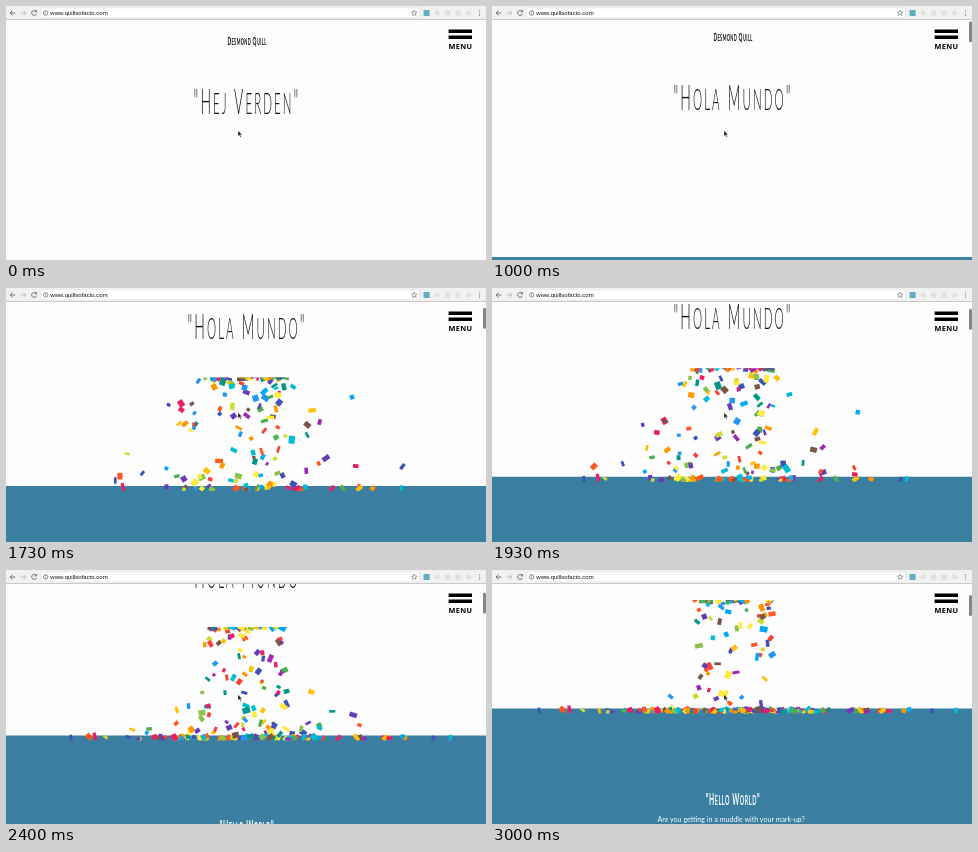
An HTML page with a canvas for the animation above (3.07 s loop, 480 by 254 pixels).

```html
<!DOCTYPE html>
<html lang="en">
<head>
<meta charset="utf-8">
<title>Hello World</title>
<style>
html, body { margin: 0; width: 100%; height: 100%; overflow: hidden; background: #fefdfe; }
#stage { position: relative; width: 480px; height: 254px; overflow: hidden; background: #fefdfe; }
#page { position: absolute; left: 0; top: 0; width: 480px; height: 500px; }
#blue { position: absolute; left: 0; top: 254.5px; width: 480px; height: 245px; background: #3a7fa1; }
canvas, svg { position: absolute; left: 0; top: 0; }
.hand, .lead { position: absolute; margin: 0; white-space: nowrap; line-height: 1; transform: translate(-50%, -50%); }
.hand { left: 241px; font: 300 35px/1 Lato, sans-serif; letter-spacing: .15em; text-transform: uppercase; color: #111; transform: translate(-50%, -50%) scaleX(.4); }
.hand span { font-size: .82em; }
#name { top: 35.3px; font-size: 12px; font-weight: 700; letter-spacing: .08em; }
#hej, #hola { top: 94px; }
#hello { top: 346px; font-size: 16.8px; font-weight: 700; letter-spacing: .08em; color: #fff; }
.lead { top: 365.5px; left: 239px; font: 400 7.1px/1 Lato, sans-serif; color: #fff; }
#thumb { position: absolute; left: 476.6px; top: 15px; width: 3px; height: 21px; border-radius: 2px; background: #858585; }
</style>
</head>
<body>
<div id="stage">
  <div id="page">
    <div id="blue"></div>
    <p class="hand" id="name">D<span>esmond</span> Q<span>uill</span></p>
    <h1 class="hand" id="hej">"H<span>ej</span> V<span>erden</span>"</h1>
    <h1 class="hand" id="hola">"H<span>ola</span> M<span>undo</span>"</h1>
    <h2 class="hand" id="hello">"H<span>ello</span> W<span>orld</span>"</h2>
    <p class="lead">Are you getting in a muddle with your mark-up?</p>
  </div>
  <canvas id="confetti" width="480" height="254"></canvas>
  <div id="thumb"></div>
  <svg width="480" height="254" viewBox="0 0 480 254">
    <rect width="480" height="14" fill="#f1f1f1"/>
    <rect y="13" width="480" height="1" fill="#c9c9c9"/>
    <rect x="34.5" y="1.8" width="379" height="10" rx="1.5" fill="#fff" stroke="#dcdcdc" stroke-width=".6"/>
    <g fill="none" stroke="#666" stroke-width=".9">
      <path d="M9.3 7H4.2M6.5 4.6L4.1 7l2.4 2.4"/>
      <path d="M14.6 7h5.1M17.4 4.6L19.8 7l-2.4 2.4" stroke="#b9b9b9"/>
      <path d="M30.2 5.4A2.5 2.5 0 1 0 30.5 7.8M30.6 4v1.9h-2"/>
      <circle cx="39.6" cy="7" r="2.3" stroke-width=".7"/>
      <path d="M39.6 6.6v1.8M39.6 5.3v.7" stroke-width=".7"/>
      <path d="M408.3 4.2l.8 1.9 2 .1-1.6 1.3.6 2-1.8-1.1-1.8 1.1.6-2-1.6-1.3 2-.1z" stroke-width=".6"/>
    </g>
    <text x="44.3" y="9.1" font-family="'Liberation Sans', Arial, sans-serif" font-size="6" fill="#111">www.quillsofacto.com</text>
    <rect x="417.6" y="4" width="6" height="6" fill="#62adc0"/>
    <g fill="#e0e0e0">
      <circle cx="431.2" cy="7" r="2.4"/>
      <rect x="439" y="4.6" width="5" height="5"/>
      <rect x="449.6" y="4.6" width="5" height="5"/>
      <circle cx="462.6" cy="7" r="2.5"/>
    </g>
    <g fill="#777">
      <circle cx="473.5" cy="4.8" r=".6"/><circle cx="473.5" cy="7" r=".6"/><circle cx="473.5" cy="9.2" r=".6"/>
    </g>
    <path d="M442.6 23.5h23.4v3.6h-23.4zM442.6 29.4h23.4v3.6h-23.4z" fill="#000"/>
    <text x="454.5" y="42.6" text-anchor="middle" font-family="'Open Sans', sans-serif" font-weight="700" font-size="7.3" letter-spacing=".4" fill="#000">MENU</text>
    <path d="M232 124.6v5.7l1.3-1.2 1 2.2 1-.5-1-2.1h1.8z" fill="#111" stroke="#fff" stroke-width=".4"/>
  </svg>
</div>
<script>
const LOOP = 3070, STEP = 1000 / 15, LAST = 45;
const TOP = 146.5, FLOOR = 257.3, BOTTOM = 260, GRAVITY = 1, COUNT = 280;
const SCROLL = [[14, 0], [15, 4], [20, 33], [26, 57], [32, 75.5], [36, 89.5], [45, 116.5]];
const COLORS = ['#f44336', '#e91e63', '#9c27b0', '#673ab7', '#3f51b5', '#2196f3', '#03a9f4', '#00bcd4', '#009688',
  '#4caf50', '#8bc34a', '#cddc39', '#ffeb3b', '#ffc107', '#ff9800', '#ff5722', '#795548'];

const el = id => document.getElementById(id);
const ctx = el('confetti').getContext('2d');

let seed = 20;
function rand(lo = 0, hi = 1) {
  seed = (seed + 0x6D2B79F5) | 0;
  let n = Math.imul(seed ^ (seed >>> 15), 1 | seed);
  n = (n + Math.imul(n ^ (n >>> 7), 61 | n)) ^ n;
  return lo + ((n ^ (n >>> 14)) >>> 0) / 4294967296 * (hi - lo);
}

// The first pieces burst wide, later ones drop almost straight down.
function makePiece(order) {
  const born = 13 + 40 * order ** 1.5;
  const burst = Math.max(0, 1 - Math.max(0, born - 18) / 11);
  const side = rand(-1, 1);
  const vy = 1 + 12 * rand() ** 2;
  return {
    born, vy,
    x: 240 + rand(-1, 1) * (39 + 28 * burst),
    drift: side * 14 + side * Math.abs(side) * 175 * burst,
    fall: (Math.sqrt(vy * vy + 2 * GRAVITY * (FLOOR - TOP)) - vy) / GRAVITY,
    hop: rand() < .3 * burst ? rand(4, 8) : 0,
    rest: rand(-1.5, 1.5),
    w: rand(3, 8), h: rand(2.5, 6),
    turn: rand(0, 6.3), spin: rand(-.35, .35),
    color: COLORS[Math.floor(rand(0, COLORS.length))]
  };
}
const pieces = Array.from({ length: COUNT }, (_, i) => makePiece(i / COUNT));

function scrollAt(k) {
  if (k <= SCROLL[0][0]) return 0;
  const i = SCROLL.findIndex(p => p[0] >= k);
  const [a, from] = SCROLL[i - 1], [b, to] = SCROLL[i];
  return from + (to - from) * (k - a) / (b - a);
}

function drawPiece(p, k, floor) {
  if (k < p.born - 4) return;
  const age = Math.max(0, k - p.born);
  const since = Math.max(0, age - p.fall);
  const air = Math.min(age, p.fall);
  const lift = Math.max(0, p.hop * since - GRAVITY / 2 * since * since);
  const x = p.x + p.drift * (1 - Math.exp(-age / 12));
  const y = TOP + p.vy * air + GRAVITY / 2 * air * air - lift;
  ctx.save();
  ctx.translate(x, Math.min(y, floor) + p.rest);
  ctx.rotate(p.turn + p.spin * (air + (lift ? since : 0)));
  ctx.fillStyle = p.color;
  ctx.fillRect(-p.w / 2, -p.h / 2, p.w, p.h);
  ctx.restore();
}

function drawConfetti(k, scroll) {
  ctx.clearRect(0, 0, 480, 254);
  if (k < 17) return;
  const small = k < 22; // the area starts small, then widens
  ctx.save();
  ctx.translate(0, -scroll);
  ctx.beginPath();
  if (small) ctx.rect(192.5, TOP, 95, 44.5);
  else ctx.rect(0, TOP, 480, BOTTOM - TOP);
  ctx.clip();
  pieces.forEach(p => drawPiece(p, k, small ? 188.5 : FLOOR));
  ctx.restore();
}

function render(t) {
  const k = Math.min(LAST, Math.floor((t + 4) / STEP));
  const scroll = scrollAt(k);
  el('page').style.transform = `translateY(${-scroll}px)`;
  el('hej').style.visibility = k < 10 ? 'visible' : 'hidden';
  el('hola').style.visibility = k < 10 ? 'hidden' : 'visible';
  el('thumb').style.visibility = k < 15 ? 'hidden' : 'visible';
  el('thumb').style.transform = `translateY(${scroll * .085}px)`;
  drawConfetti(k, scroll);
}

const start = performance.now();
function tick() {
  render((performance.now() - start) % LOOP);
  requestAnimationFrame(tick);
}
tick();
</script>
</body>
</html>
```
